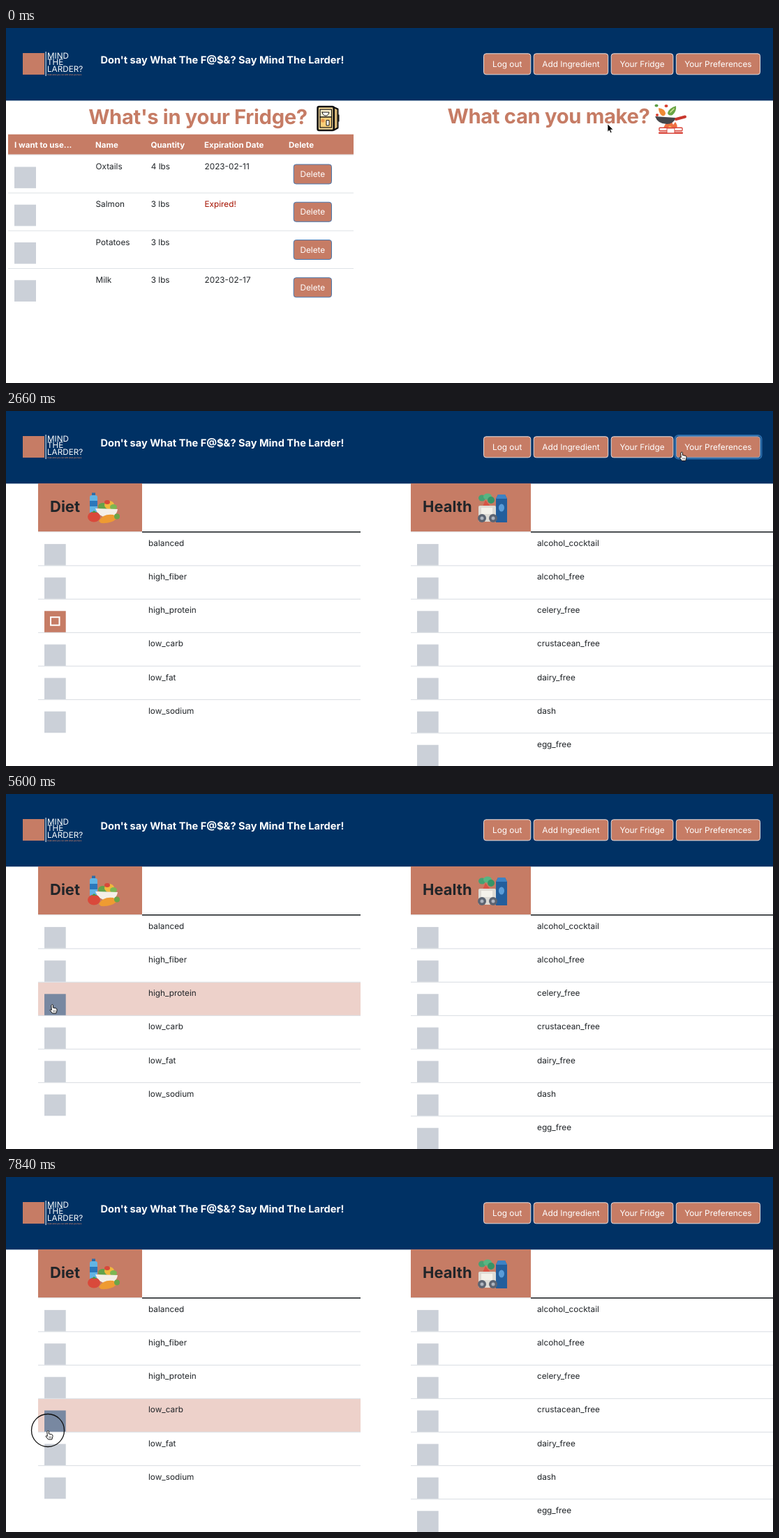
Animation, 1099 px wide and 510 px high, one loop 8 s. Source, as an HTML page:

```html
<!DOCTYPE html>
<html lang="en">
<head>
<meta charset="utf-8">
<title>Fridge preferences</title>
<style>
html, body { margin: 0; height: 100%; overflow: hidden; background: #fff; }
svg { display: block; width: 1099px; height: 510px; }
text { font: 11.8px Inter, "Liberation Sans", sans-serif; font-optical-sizing: none; text-rendering: geometricPrecision; fill: #212529; white-space: pre; }
.light { fill: #fff; }
.mid { text-anchor: middle; }
.th { font-weight: 700; font-size: 11.5px; fill: #fff; }
.title { font-weight: 700; font-size: 29.2px; letter-spacing: -.33px; fill: #c67c65; text-anchor: middle; }
.group { font-weight: 700; font-size: 22px; }
.slogan { font-weight: 700; font-size: 14.6px; fill: #fff; }
.brand { font-size: 11.7px; fill: #fff; }
.tiny { font-size: 2.6px; font-weight: 700; fill: #c67c65; }
.expired { fill: #a61200; }
</style>
</head>
<body>
<svg id="stage" viewBox="0 0 1099 510"></svg>
<script>
const ORANGE = '#c67c65', GRAY = '#cbd0d8', LINE = '#dee2e6', DARK = '#7888a1';
const TOP = 174.3, PITCH = 48.1;

const rect = (x, y, w, h, fill, more = '') =>
  `<rect x="${x}" y="${y}" width="${w}" height="${h}" fill="${fill}" ${more}/>`;
const text = (x, y, s, cls = '') => `<text x="${x}" y="${y}" class="${cls}">${s}</text>`;
const path = (d, fill, stroke = 'none', w = 1) =>
  `<path d="${d}" fill="${fill}" stroke="${stroke}" stroke-width="${w}" stroke-linejoin="round" stroke-linecap="round"/>`;
const oval = (x, y, rx, ry, fill) => `<ellipse cx="${x}" cy="${y}" rx="${rx}" ry="${ry}" fill="${fill}"/>`;
const button = (x, y, w, h, label, border, id = '') =>
  rect(x + .5, y + .5, w - 1, h - 1, ORANGE, `rx="3.5" stroke="${border}" ${id}`) +
  text(x + w / 2, y + h / 2 + 4.2, label, 'light mid');

const fridgeIcon =
  path('M470 114L475.5 116.5V143.5L470 146.5Z', '#d9b878', '#111', 2) + path('M476.8 125V134', 'none', '#111', 1.4) +
  rect(446.6, 113, 23, 34, '#fbdf9c', 'rx="2" stroke="#111" stroke-width="2.6"') +
  rect(450, 117, 16.5, 11, '#fff2cf', 'stroke="#111" stroke-width="1.2"') +
  rect(450, 128, 16.5, 15, '#f7cf7a', 'stroke="#111" stroke-width="1.2"') +
  path('M453 121H463Q462 126 458 126T453 121Z', '#fff', '#111', 1) +
  oval(454, 133, 2.6, 2.6, '#e8964c') + path('M459 133V140H463V133Z', '#fff', '#111', 1);

const panIcon =
  oval(932, 111.5, 2.5, 2, '#5f9e45') + oval(933, 125, 2, 2, '#d8402f') + oval(946, 112, 2.5, 2, '#d8402f') +
  path('M935 115Q944 116 945 122Q945 127 940 126Q935 122 935 115Z', '#ef8b35') +
  path('M960 112Q961 120 955 125Q949 127 948 122Q950 115 960 112Z', '#6aa545') +
  path('M952 121L957 116', 'none', '#d9e5a2', 1.5) +
  path('M942 144Q944 138 947 136Q949 139 951 132Q955 136 956 139L959 135Q963 140 961 144Z', '#ee7042') +
  path('M948 144Q951 137 955 144Z', '#fbc14e') +
  path('M930 127L960 129Q956 138 947 138Q934 138 930 127Z', '#44464b') +
  path('M960 131L973 127.5', 'none', '#c8372d', 4) +
  rect(936, 143.2, 33, 4.5, '#fff', 'rx="1" stroke="#d9473c" stroke-width="1.4"') +
  rect(935, 149.5, 35, 2.6, '#d9473c', 'rx="1"') + rect(947, 144, 11, 7, '#fff', 'stroke="#d9473c"');

const dietIcon =
  rect(123, 117.5, 5, 4, '#2d6da8') + rect(120, 121, 11, 27, '#62b4e4', 'rx="3"') + rect(120, 129, 11, 8, '#2b77ba') +
  oval(139, 137, 7, 5, '#63a24b') + oval(148, 135, 7, 6, '#f0b83d') + oval(145, 131, 4, 3, '#d8493a') +
  oval(154, 138, 5, 4, '#7db653') + path('M128 140L160 141Q158 153 145 153Q132 152 128 140Z', '#f4efe7') +
  oval(126, 152, 9, 7.5, '#d9493b') + path('M123 146L126 143L130 146Z', '#4e953f') +
  path('M133 158Q139 147 154 149L158 155Q151 162 136 161Z', '#ee9b32') + oval(159, 151.5, 4, 4, '#6ba548');

const healthIcon =
  path('M702 126L705 120H715L718 126V160H702Z', '#235e9c') + path('M702 126H718L715 120H705Z', '#3d82c4') +
  oval(710, 139, 4, 5.5, '#5a9cd8') +
  oval(682, 125, 5, 4.5, '#46a173') + oval(690, 123, 6, 4.5, '#58b582') + oval(695, 128, 5, 5, '#369467') +
  path('M683 137L687 128L694 137Z', '#d85345') + rect(677, 136, 25, 23, '#dedbd5', 'rx="2"') +
  rect(681, 139, 16, 9, '#f4f1ea') + oval(682, 154, 6, 6, '#5c6472') + oval(698, 154, 6, 6, '#5c6472') +
  oval(682, 154, 2.5, 2.5, '#aeb4be') + oval(698, 154, 2.5, 2.5, '#aeb4be');

const header =
  rect(0, 0, 1099, 104.3, '#003164') + rect(24, 36, 31, 31, ORANGE) + rect(56.6, 34, 1, 35, '#fff') +
  ['MIND', 'THE', 'LARDER?'].map((s, i) => text(59, 43.5 + i * 9.5, s, 'brand')).join('') +
  text(59, 67.8, 'Cook what you can with what you have', 'tiny') +
  text(135.5, 51, "Don't say What The F@$&amp;? Say Mind The Larder!", 'slogan') +
  rect(958.5, 35, 124, 33.5, 'none', 'rx="5" stroke="#2c6fae" stroke-width="2" id="glow"') +
  button(684, 36.3, 68.3, 31, 'Log out', '#e6dfe0') + button(755.7, 36.3, 107.5, 31, 'Add Ingredient', '#e6dfe0') +
  button(866.7, 36.3, 89.7, 31, 'Your Fridge', '#e6dfe0') +
  button(959.8, 36.3, 121.2, 31, 'Your Preferences', '#e6dfe0', 'id="prefs"');

const foods = [['Oxtails', '4 lbs', '2023-02-11'], ['Salmon', '3 lbs', 'Expired!'],
  ['Potatoes', '3 lbs', ''], ['Milk', '3 lbs', '2023-02-17']];
const columns = [[12, 'I want to use...'], [128, 'Name'], [207.5, 'Quantity'], [284, 'Expiration Date'], [405, 'Delete']];

const fridgePage =
  text(275, 138, "What's in your Fridge?", 'title') + fridgeIcon +
  text(777.5, 137, 'What can you make?', 'title') + panIcon +
  rect(3, 152.8, 495, 28.9, ORANGE) + rect(3, 181.7, 495, 1, LINE) +
  columns.map(([x, s]) => text(x, 172, s, 'th')).join('') +
  foods.map(([name, amount, date], i) => {
    const y = 182.5 + i * 54.25;
    return rect(12, y + 17, 31, 30.7, GRAY) + text(128.5, y + 20.5, name) + text(207.7, y + 20.5, amount) +
      text(284.5, y + 20.5, date, date === 'Expired!' ? 'expired' : '') +
      button(411.7, y + 13, 55.3, 29, 'Delete', '#4678b0') + (i < 3 ? rect(3, y + 54, 495, 1, LINE) : '');
  }).join('');

const diets = ['balanced', 'high_fiber', 'high_protein', 'low_carb', 'low_fat', 'low_sodium'];
const healths = ['alcohol_cocktail', 'alcohol_free', 'celery_free', 'crustacean_free', 'dairy_free', 'dash', 'egg_free'];

function prefTable(x, headWidth, width, label, rows, id) {
  const body = rows.map((s, i) => {
    const y = TOP + i * PITCH;
    return rect(x + 9, y + 16.8, 30.7, 30.7, GRAY, `id="${id}${i}"`) + text(x + headWidth + 9, y + 19.8, s) +
      (i < rows.length - 1 ? rect(x, y + 47.3, width, 1.2, LINE) : '');
  }).join('');
  return body + rect(x, 104, headWidth, 69.3, ORANGE) + rect(x, 173.3, headWidth, 1, LINE) +
    rect(x + headWidth, 173, width - headWidth, 1.6, '#212529') + text(x + 17, 145, label, 'group');
}

const prefsPage =
  rect(46, 0, 462, PITCH, '#edd1ca', 'id="hover"') +
  prefTable(46, 149, 462, 'Diet', diets, 'diet') + dietIcon +
  prefTable(580, 172, 519, 'Health', healths, 'health') + healthIcon +
  rect(64, 296.2, 12.5, 11.5, 'none', 'stroke="#fff" stroke-width="2" id="mark"');

const $ = id => document.getElementById(id);
$('stage').innerHTML = header + `<g id="fridge">${fridgePage}</g><g id="preferences">${prefsPage}</g>
  <g id="cursor"><circle id="ring" r="23.5" fill="none" stroke="#111" stroke-width="1.3"/>
  <g id="arrow">${path('M0 0V11.2L2.5 8.9L4.2 12.7L6 11.9L4.3 8.1H7.8Z', '#000', '#fff', .7)}</g>
  <g id="hand">${path('M-1 1.3Q.2 -.6 1.4 1.2V5L5.8 5.9Q7.2 6.4 7 8.6L5.8 13H.5L-3 8.6Q-2.9 6.9 -1 8.2Z', '#fff', '#111', 1) +
    path('M2 9V11M4.2 9V11', 'none', '#111', .7)}</g></g>`;

// Pointer stops: time, x, y
const stops = [[350, 862, 138], [560, 873, 130], [770, 924, 95], [980, 963, 68], [1190, 976, 59], [1330, 976, 59],
  [1470, 977, 54.5], [2590, 977, 54.5], [2660, 968, 58.5], [2870, 820, 105], [3080, 600, 166], [3290, 472, 198],
  [3430, 447, 212], [3500, 445, 219], [3570, 443, 224], [3780, 425, 235], [4200, 425, 235], [4410, 298, 271],
  [4480, 254, 275], [4690, 140, 291], [4900, 77, 300], [5040, 66, 302], [6720, 66, 302], [6930, 63, 318],
  [7140, 61, 351], [7350, 60, 364], [8000, 60, 364]];

function pointerAt(t) {
  const i = stops.findIndex(s => s[0] >= t);
  if (i < 1) return stops[0].slice(1);
  const [t0, x0, y0] = stops[i - 1], [t1, x1, y1] = stops[i], k = (t - t0) / (t1 - t0);
  return [x0 + (x1 - x0) * k, y0 + (y1 - y0) * k];
}

const show = (id, on) => $(id).style.display = on ? '' : 'none';
const within = (t, from, to) => t >= from && t < to;

function draw(time) {
  const t = Math.floor(time % 8000 / 70) * 70;
  const onPrefs = t >= 2240, focused = within(t, 2240, 5110);
  const [x, y] = pointerAt(t), [hx, hy] = pointerAt(t - 70); // hover lags one step
  const onButton = hx > 960 && hx < 1081 && hy > 36 && hy < 67;
  const row = onPrefs && hx > 46 && hx < 508 && hy > TOP ? Math.floor((hy - TOP) / PITCH) : -1;
  const onBox = row >= 0 && hx > 55 && hx < 86 && hy - TOP - row * PITCH > 16.8;
  const hovered = within(t, 5950, 6790) ? -1 : row;
  const checked = t < 5180;

  show('fridge', !onPrefs);
  show('preferences', onPrefs);
  show('glow', focused);
  $('prefs').setAttribute('stroke', focused ? '#8fb0d3' : onButton && t >= 1400 ? '#3b5f86' : '#e6dfe0');

  show('hover', hovered >= 0);
  $('hover').setAttribute('y', TOP + hovered * PITCH);
  diets.forEach((_, i) => $('diet' + i).setAttribute('fill',
    i === 2 && checked ? ORANGE : onBox && i === hovered ? DARK : GRAY));
  show('mark', checked);

  $('cursor').setAttribute('transform', `translate(${x} ${y})`);
  show('hand', onButton || onBox);
  show('arrow', !onButton && !onBox);
  show('ring', within(t, 1680, 2030) || within(t, 5110, 5460) || t >= 7770);
}

const start = performance.now();
(function tick() {
  draw(performance.now() - start);
  requestAnimationFrame(tick);
})();
</script>
</body>
</html>
```
